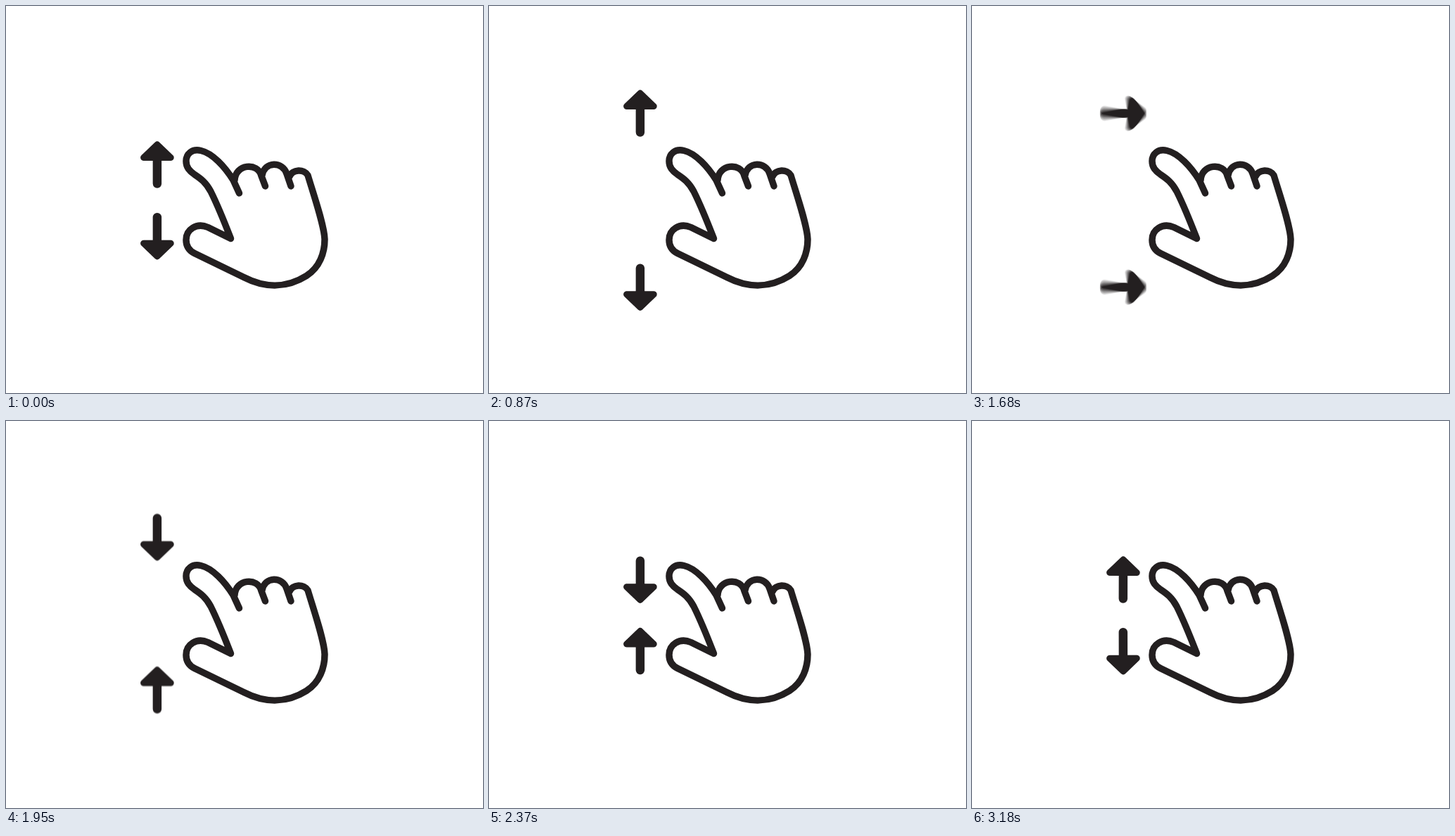
Animation of 678x550 px, one loop 3390 ms. Source, as an HTML page with a canvas:

```html
<!DOCTYPE html>
<html lang="en">
<head>
<meta charset="utf-8">
<title>Pinch gesture</title>
<style>
  html, body { margin: 0; width: 100%; height: 100%; overflow: hidden; background: #fff; }
  canvas { display: block; }
</style>
</head>
<body>
<canvas id="stage" width="678" height="550"></canvas>
<script>
const ctx = document.getElementById('stage').getContext('2d');
const WIDTH = 678;
const HEIGHT = 550;
const INK = '#231f20';
const LOOP = 3390;
const STEP = 30;
const SHUTTER = 15;   // motion blur window in ms
const SAMPLES = 15;

const hand = new Path2D(
  'M331.5 265.5 L323 247 C311 228 294 209 277 205 C264 202 256 210 256 220' +
  'C256 229 261 234 268 239 C277 245 284 250 291 263 C302 285 311 308 319.5 330' +
  'L287 314 C271 307 256 317 256 332 C256 341 260 347 268 351 L338 385' +
  'C369 401 400 400 427 383 C446 371 453 350 453 331 C452.5 312 438 270 429 240' +
  'C424 231 407 231 403 242' +
  'M325 247 C326 224 358 221 363 241 L368.5 255.5' +
  'M364 240 C368 220 393 220 399 238 L405 255.5');

// Arrow pointing up, centred on the origin
function makeArrow() {
  const path = new Path2D();
  const tip = -34.9, base = -5.7, half = 30.5, corner = 4.5;
  path.moveTo(0, base);
  path.arcTo(-half, base, 0, tip, corner);
  path.arcTo(0, tip, half, base, corner);
  path.arcTo(half, base, 0, base, corner);
  path.closePath();
  path.roundRect(-6.2, -18, 12.4, 51.2, 6.2);
  return path;
}
const arrow = makeArrow();

// Eased progress from 0 to 1 between two times
function ease(t, start, end) {
  const x = Math.min(1, Math.max(0, (t - start) / (end - start)));
  return x * x * (3 - 2 * x);
}

const turn = t => 180 * (ease(t, 1590, 1770) - ease(t, 3000, 3180));
const spread = (t, backStart, backEnd) => ease(t, 0, 420) - ease(t, backStart, backEnd);

const poses = [
  t => ({ y: 225.6 - 73 * spread(t, 1800, 2370), angle: turn(t) }),
  t => ({ y: 327.1 + 72.5 * spread(t, 1770, 2340), angle: 180 - turn(t) })
];

function drawArrow({ y, angle }) {
  ctx.save();
  ctx.translate(214.9, y);
  ctx.rotate(angle * Math.PI / 180);
  ctx.fill(arrow);
  ctx.restore();
}

// Adds up faint copies over the shutter window, then tints the sum
function drawArrows(t) {
  ctx.save();
  ctx.globalCompositeOperation = 'lighter';
  ctx.globalAlpha = 1 / SAMPLES;
  ctx.fillStyle = '#000';
  for (let i = 0; i < SAMPLES; i++) {
    const moment = t + SHUTTER * ((i + 0.5) / SAMPLES - 0.5);
    for (const pose of poses) drawArrow(pose(moment));
  }
  ctx.globalCompositeOperation = 'source-in';
  ctx.globalAlpha = 1;
  ctx.fillStyle = INK;
  ctx.fillRect(0, 0, WIDTH, HEIGHT);
  ctx.restore();
}

function drawHand() {
  ctx.save();
  ctx.translate(0, 0.5);
  ctx.strokeStyle = INK;
  ctx.lineWidth = 9.5;
  ctx.lineCap = ctx.lineJoin = 'round';
  ctx.stroke(hand);
  ctx.restore();
}

function render(t) {
  ctx.clearRect(0, 0, WIDTH, HEIGHT);
  drawArrows(t);
  drawHand();
}

let origin;
let shown = 0;
function tick(now) {
  origin ??= now;
  const t = Math.floor(((now - origin) % LOOP) / STEP) * STEP;
  if (t !== shown) render(shown = t);
  requestAnimationFrame(tick);
}
render(0);
requestAnimationFrame(tick);
</script>
</body>
</html>
```
